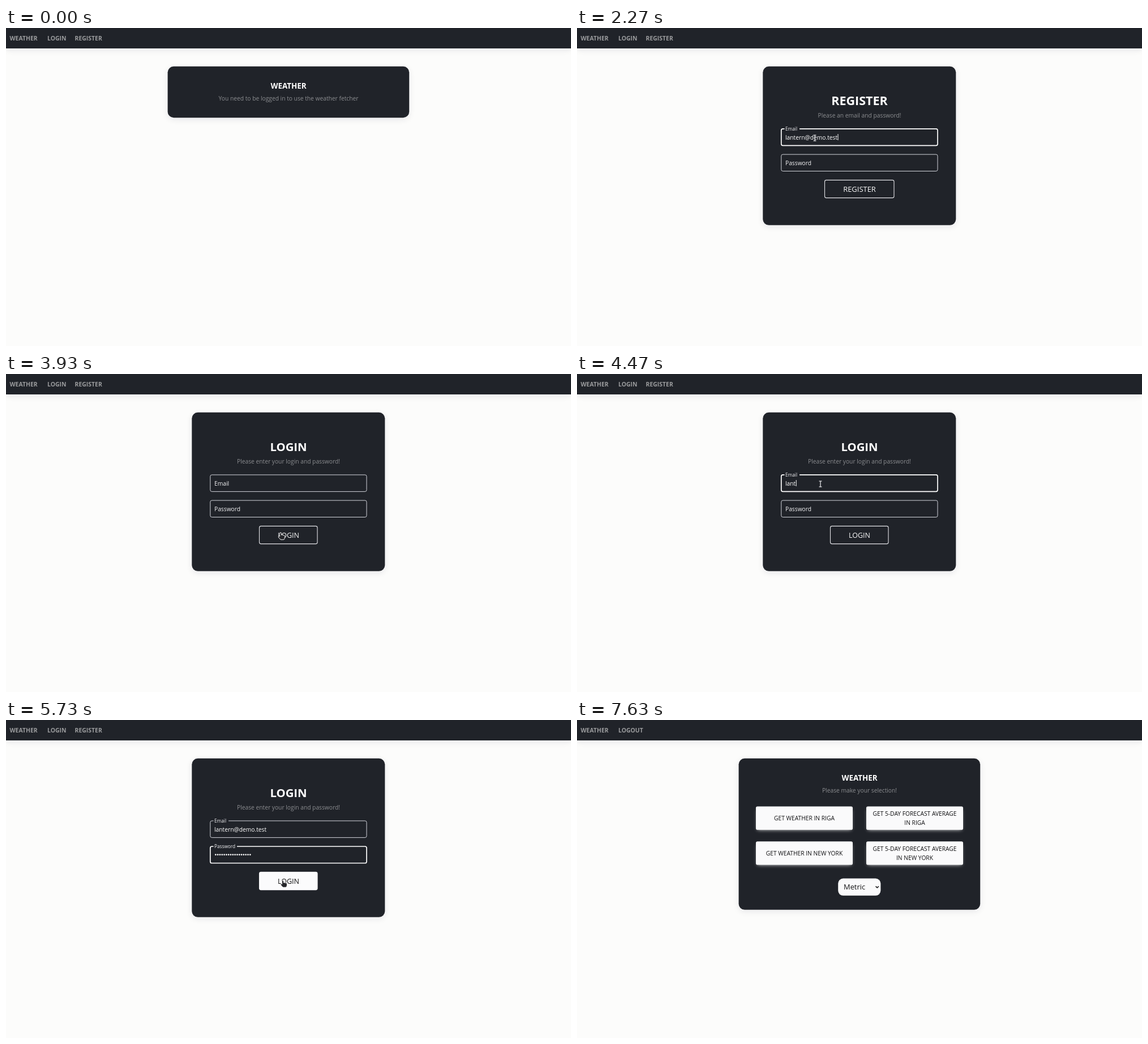
An HTML page with a canvas for the animation above (7.71 s loop, 998 px wide and 561 px high).

```html
<!DOCTYPE html>
<html lang="en">
<head>
<meta charset="utf-8">
<title>Weather</title>
<style>
  html, body { margin: 0; width: 100%; height: 100%; overflow: hidden; background: #fcfcfb; }
  canvas { display: block; width: 998px; height: 561px; }
</style>
</head>
<body>
<canvas id="stage"></canvas>
<script>
const W = 998, H = 561, LOOP = 7710;
const DARK = '#202329', LIGHT = '#fafafb', MUTED = '#8b8d90';
const FONT = "'Open Sans', 'Noto Sans', sans-serif";
const ADDRESS = 'lantern@demo.test', DOTS = 17;

const canvas = document.getElementById('stage');
const ctx = canvas.getContext('2d');
const dpr = window.devicePixelRatio || 1;
canvas.width = Math.round(W * dpr);
canvas.height = Math.round(H * dpr);

const clamp = v => Math.max(0, Math.min(1, v));
const mix = (a, b, p) => a + (b - a) * p;
const ease = p => p * p * (3 - 2 * p);
const ramp = (t, start, end) => clamp((t - start) / (end - start));
const inside = (x, y, l, t, r, b) => x >= l && x <= r && y >= t && y <= b;

// Times of each form visit
const register = {
  title: 'REGISTER', titleSize: 21.5, sub: 'Please an email and password!',
  btn: [437.5, 122.5, 12.95],
  email: 1740, type1: [1820, 2260], pass: 2440, type2: [2500, 2840],
  hover: 2927, caretOff: 3200
};
const login = {
  title: 'LOGIN', titleSize: 20.3, sub: 'Please enter your login and password!',
  btn: [447.5, 102.5, 12.5],
  email: 4290, type1: [4370, 4820], pass: 5010, type2: [5110, 5500],
  hover: 5570, caretOff: 5620
};

// Pointer stops: time, x, y
const path = [
  [500, 981, 211], [930, 25, 14], [1010, 25, 14], [1210, 126, 13],
  [1450, 126, 13], [1700, 420, 194], [2290, 420, 194], [2420, 415, 238],
  [2850, 415, 238], [2975, 482, 284], [3470, 482, 284], [3800, 485, 280],
  [3980, 485, 280], [4240, 430, 194], [4840, 430, 194], [4970, 402, 238],
  [5510, 402, 238], [5640, 489, 283], [6300, 489, 283], [6840, 1000, 386]
];

function text(str, x, y, size, color, align = 'left', weight = 400) {
  ctx.font = `${weight} ${size}px ${FONT}`;
  ctx.textAlign = align;
  ctx.fillStyle = color;
  ctx.fillText(str, x, y);
}

function round(x, y, w, h, r) {
  ctx.beginPath();
  ctx.roundRect(x, y, w, h, r);
}

function shadow(color, blur, dy) {
  ctx.shadowColor = color;
  ctx.shadowBlur = blur * dpr;
  ctx.shadowOffsetY = dy * dpr;
}

function panel(x, y, w, h, r) {
  ctx.save();
  ctx.fillStyle = DARK;
  shadow('rgba(20,20,60,.09)', 12, 3);
  round(x, y, w, h, r);
  ctx.fill();
  ctx.restore();
}

function nav(items) {
  panel(0, 0, W, 36, 0);
  const xs = [6.5, 73, 121.5];
  items.forEach((s, i) => text(s, xs[i], 21.5, 10.45, '#9b9c9e', 'left', 700));
}

function caret(x, y) {
  ctx.fillStyle = '#fff';
  ctx.fillRect(x, y - 5.5, 1, 11);
}

function field(label, y, float, focused, notch) {
  ctx.strokeStyle = focused ? '#fff' : '#d3d5dc';
  ctx.lineWidth = focused ? 1.7 : 1;
  round(360.8, y, 276.2, 29.5, 2.8);
  ctx.stroke();
  if (float > 0) {
    ctx.fillStyle = DARK;
    ctx.fillRect(366.5, y - 2, notch * float, 4);
  }
  text(label, 368, mix(y + 19, y + 2.9, float), mix(10.25, 8.25, float), '#f2f2f4');
}

function form(f, t) {
  panel(328.3, 67.8, 341, 280, 10.5);
  text(f.title, 499, 136.2, f.titleSize, '#fff', 'center', 700);
  text(f.sub, 499, 157.6, 10.25, MUTED, 'center');

  const switched = t >= f.pass - 25;
  field('Email', 177.9, ease(ramp(t, f.email, f.email + 110)),
    t >= f.email && t < f.pass, 26.5);
  field('Password', 223, ease(ramp(t, f.pass, f.pass + 90)), t >= f.pass, 41.5);

  const typed = ADDRESS.slice(0, Math.round(ramp(t, ...f.type1) * ADDRESS.length));
  text(typed, 368, 196.6, 10.25, '#fff');
  if (t >= f.email && !switched) caret(368.5 + ctx.measureText(typed).width, 192.5);

  const dots = Math.round(ramp(t, ...f.type2) * DOTS);
  ctx.fillStyle = '#fff';
  for (let i = 0; i < dots; i++) {
    ctx.beginPath();
    ctx.arc(370.3 + i * 3.81, 237.6, 1.35, 0, 7);
    ctx.fill();
  }
  if (switched && t < f.caretOff) caret(368.5 + dots * 3.77, 237.5);

  const [x, w, size] = f.btn;
  const hover = ease(ramp(t, f.hover, f.hover + 150));
  round(x, 268.4, w, 31.2, 2.8);
  ctx.fillStyle = `rgba(251,251,252,${hover})`;
  ctx.fill();
  ctx.lineWidth = 1.1;
  ctx.strokeStyle = hover > 0 ? `rgba(251,251,252,${mix(.9, 1, hover)})` : '#e4e4e8';
  ctx.stroke();
  const ink = mix(250, 15, clamp(hover * 1.25));
  text(f.title, 499, 288.7, size, `rgb(${ink},${ink},${ink})`, 'center');
}

function weatherHead(height, sub) {
  panel(285.6, 67.8, 426.6, height, 10.5);
  text('WEATHER', 499, 107.2, 13.4, '#fff', 'center', 700);
  text(sub, 499, 127.6, 10.25, MUTED, 'center');
}

function choice(x, y, lines) {
  ctx.save();
  ctx.fillStyle = LIGHT;
  shadow('rgba(251,251,251,.85)', 6, 2.8);
  round(x + 2.7, y + 2.7, 165.6, 35.8, 2);
  ctx.fill();
  ctx.restore();
  ctx.fillStyle = LIGHT;
  round(x, y, 171, 41.2, 2.8);
  ctx.fill();
  const first = y + 24.5 - (lines.length - 1) * 8;
  lines.forEach((s, i) => text(s, x + 85.5, first + i * 16, 10.25, '#101012', 'center'));
}

function dashboard() {
  weatherHead(267, 'Please make your selection!');
  ['RIGA', 'NEW YORK'].forEach((city, i) => {
    const y = 152.5 + i * 61.8;
    choice(316, y, ['GET WEATHER IN ' + city]);
    choice(511, y, ['GET 5-DAY FORECAST AVERAGE', 'IN ' + city]);
  });
  ctx.fillStyle = LIGHT;
  round(461.2, 279.5, 75.2, 30.3, 9);
  ctx.fill();
  text('Metric', 471, 299.2, 12.9, '#151517');
  ctx.strokeStyle = '#151517';
  ctx.lineWidth = 1.5;
  ctx.beginPath();
  ctx.moveTo(527.6, 293.4);
  ctx.lineTo(530.2, 296);
  ctx.lineTo(532.8, 293.4);
  ctx.stroke();
}

const arrow = new Path2D('M0 0V10.6L2.6 8.2L4.3 12L6 11.2L4.4 7.6H7.8Z');
const hand = new Path2D('M-1 1Q0 -.6 1 1V4.4Q2 3.6 2.9 4.5Q4 3.8 4.9 4.9Q6.8 4.4 6.9 6.2V9Q6.6 11.6 5 11.8H.5Q-1 11 -3.4 7.4Q-3.6 5.6 -1.8 6.4L-1 7.2Z');
const beam = new Path2D('M-2.4 -5H-.8Q0 -5 0 -4.2Q0 -5 .8 -5H2.4M0 -4.2V4.2M-2.4 5H-.8Q0 5 0 4.2Q0 5 .8 5H2.4');

function pointer(t) {
  const last = path[path.length - 1];
  if (t < path[0][0] || t >= last[0]) return;
  const i = path.findIndex(k => k[0] > t);
  const [t0, x0, y0] = path[i - 1], [t1, x1, y1] = path[i];
  const p = ease(ramp(t, t0, t1));
  const x = mix(x0, x1, p), y = mix(y0, y1, p);

  const onForm = t >= 1300 && t < 6100;
  const onLink = y < 28 && (inside(x, y, 6, 8, 57, 28) ||
    inside(x, y, 73, 8, 106, 28) || inside(x, y, 121, 8, 172, 28));
  const onButton = onForm && inside(x, y, 447, 268, 550, 300);
  const onField = onForm && (inside(x, y, 361, 178, 637, 207) || inside(x, y, 361, 223, 637, 252));

  ctx.save();
  ctx.translate(x, y);
  ctx.lineJoin = 'round';
  if (onField) {
    ctx.strokeStyle = '#c9cacd';
    ctx.lineWidth = 1.5;
    ctx.stroke(beam);
  } else {
    const shape = onLink || onButton ? hand : arrow;
    ctx.strokeStyle = '#f4f4f4';
    ctx.lineWidth = 1.7;
    ctx.stroke(shape);
    ctx.fillStyle = '#25262a';
    ctx.fill(shape);
  }
  ctx.restore();
}

function draw(t) {
  ctx.setTransform(dpr, 0, 0, dpr, 0, 0);
  ctx.fillStyle = '#fcfcfb';
  ctx.fillRect(0, 0, W, H);
  const done = t >= 6100;
  nav(done ? ['WEATHER', 'LOGOUT'] : ['WEATHER', 'LOGIN', 'REGISTER']);
  if (t < 1300) weatherHead(90.4, 'You need to be logged in to use the weather fetcher');
  else if (t < 3470) form(register, t);
  else if (!done) form(login, t);
  else dashboard();
  pointer(t);
}

const start = performance.now();
function tick() {
  draw((performance.now() - start) % LOOP);
  requestAnimationFrame(tick);
}
tick();
</script>
</body>
</html>
```
